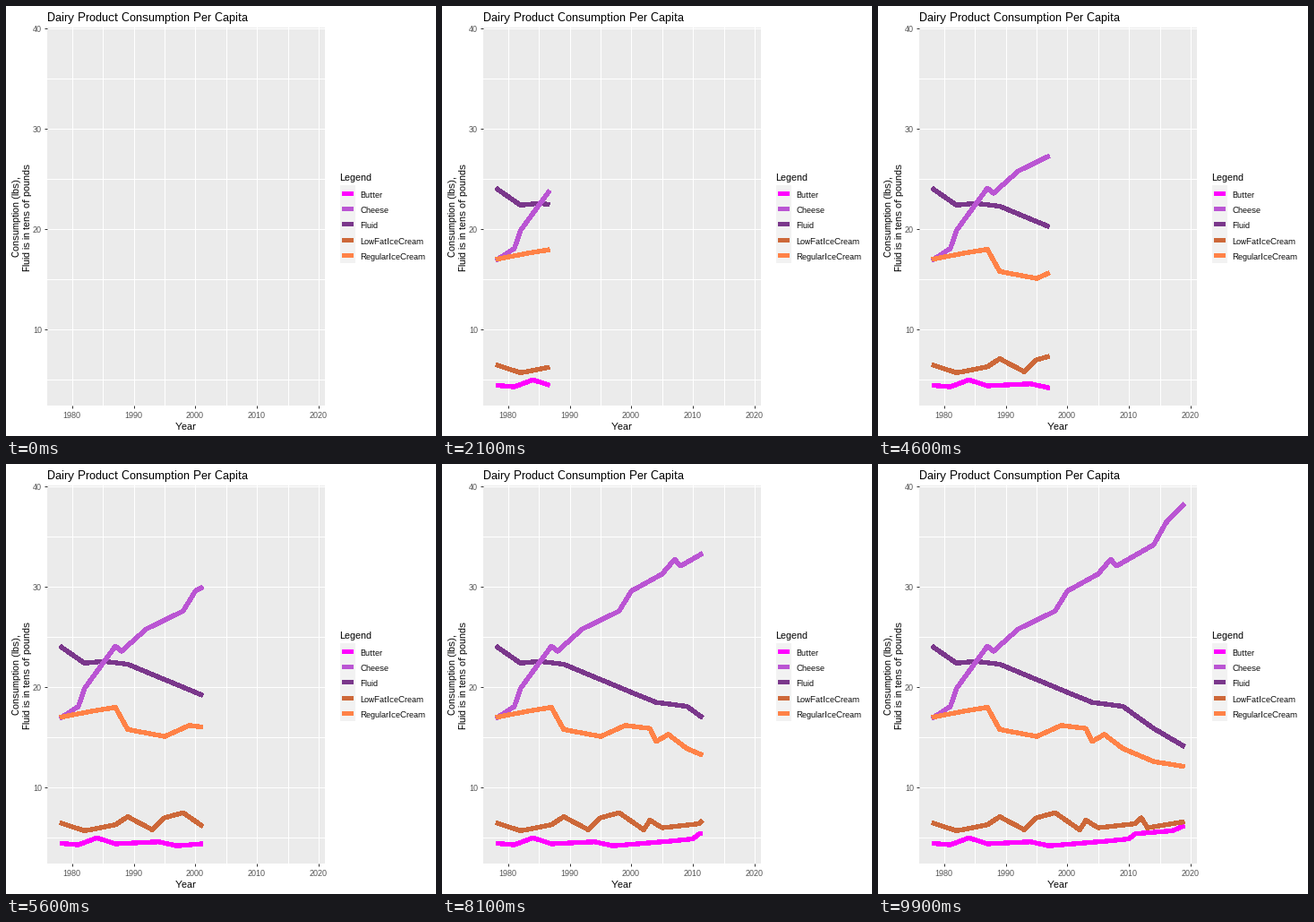
Recreate the animation shown at these times as a matplotlib script. Size 480 px wide and 480 px high, loop 10 s.

```python
import matplotlib.pyplot as plt
import numpy as np
from matplotlib.animation import FuncAnimation
from matplotlib.patches import Rectangle

SIZE, DPI = 480, 96
PX = 72 / DPI  # one pixel in points
FRAMES, INTERVAL = 100, 100
START, SPAN = 1978, 41
LEFT, TOP, RIGHT, BOTTOM = 46, 24, 356, 446
X_LIM, Y_LIM = (1975.93, 2021.03), (2.435, 40.114)
ROW = 17.28

plt.rcParams.update({
    "font.family": "Liberation Sans",
    "text.hinting": "native",
    "text.hinting_factor": 1,
})

# Name, colour, stacking order and turning points {years since START: value}
SERIES = [
    ("Butter", "#FF00FF", 2,
     {0: 4.45, 3: 4.3, 6: 5, 9: 4.4, 16: 4.6, 19: 4.2, 29: 4.7, 32: 4.9,
      33: 5.4, 39: 5.7, 41: 6.2}),
    ("Cheese", "#BA55D3", 3,
     {0: 16.9, 3: 18.1, 4: 19.9, 9: 24.1, 10: 23.6, 14: 25.8, 20: 27.6,
      22: 29.6, 27: 31.3, 29: 32.75, 30: 32.1, 36: 34.2, 38: 36.4, 41: 38.3}),
    ("Fluid", "#7A378B", 2,
     {0: 24.1, 4: 22.4, 7: 22.6, 11: 22.3, 22: 19.5, 26: 18.5, 31: 18.1,
      36: 15.9, 41: 14.1}),
    ("LowFatIceCream", "#CD6839", 2,
     {0: 6.5, 4: 5.7, 9: 6.3, 11: 7.1, 15: 5.8, 17: 7, 20: 7.5, 24: 5.8,
      25: 6.75, 27: 6, 33: 6.4, 34: 7, 35: 6, 41: 6.6}),
    ("RegularIceCream", "#FF8247", 4,
     {0: 17, 5: 17.6, 9: 18, 11: 15.8, 17: 15.1, 21: 16.2, 25: 15.9,
      26: 14.6, 28: 15.3, 31: 13.9, 36: 12.6, 41: 12.1}),
]

fig = plt.figure(figsize=(SIZE / DPI, SIZE / DPI), dpi=DPI, facecolor="white")


def text(x, y, s, size, color="black", **kw):
    """Write text with its baseline at pixel (x, y) from the top left."""
    return fig.text(x / SIZE, 1 - y / SIZE, s, fontsize=size * PX, color=color,
                    va="baseline", **kw)


def box(x, y, w, h, color):
    fig.add_artist(Rectangle((x / SIZE, 1 - (y + h) / SIZE), w / SIZE, h / SIZE,
                             facecolor=color, linewidth=0, antialiased=False))


# Panel with grid and ticks
ax = fig.add_axes([LEFT / SIZE, 1 - BOTTOM / SIZE,
                   (RIGHT - LEFT) / SIZE, (BOTTOM - TOP) / SIZE])
ax.set(xlim=X_LIM, ylim=Y_LIM, facecolor="#EBEBEB", axisbelow=True)
ax.spines[:].set_visible(False)
ax.set_xticks(range(1980, 2021, 10))
ax.set_xticks(range(1985, 2016, 10), minor=True)
ax.set_yticks(range(10, 41, 10))
ax.set_yticks(range(5, 36, 10), minor=True)
ax.tick_params(length=3 * PX, width=PX, color="#333333",
               labelbottom=False, labelleft=False)
ax.tick_params(which="minor", length=0)
ax.grid(which="both", color="white", linewidth=PX)

for year in range(1980, 2021, 10):
    x = np.interp(year, X_LIM, (LEFT, RIGHT))
    text(x - 0.5, 460, str(year), 9, "#4D4D4D", ha="center")
for value in range(10, 41, 10):
    y = np.interp(value, Y_LIM, (BOTTOM, TOP))
    text(40, y + 3.7, str(value), 9, "#4D4D4D", ha="right")

# Titles
text(46, 17, "Dairy Product Consumption Per Capita", 13)
text(201, 473, "Year", 11, ha="center")
for x, s in ((15, "Consumption (lbs),"), (27, "Fluid is in tens of pounds")):
    text(x, 235.5, s, 11, ha="center", rotation=90, rotation_mode="anchor")

# Legend
text(372, 195, "Legend", 11)
box(373, 200, 17, 87, "#F2F2F2")
for i, (name, color, *_) in enumerate(SERIES):
    box(375, round(206.9 + i * ROW), 13, 5, color)
    text(395, round(213.9 + i * ROW), name, 9)

lines = [
    ax.plot([], [], color=color, linewidth=4.3 * PX, zorder=z, antialiased=False,
            solid_capstyle="butt", solid_joinstyle="round")[0]
    for _, color, z, _ in SERIES
]


def update(frame):
    """Reveal every line up to the current moment."""
    now = SPAN * frame / (FRAMES - 1)
    for line, (*_, points) in zip(lines, SERIES):
        xs, ys = np.array(list(points)), list(points.values())
        seen = np.append(xs[xs < now], now)
        line.set_data(START + seen, np.interp(seen, xs, ys))
    return lines


anim = FuncAnimation(fig, update, frames=FRAMES, interval=INTERVAL,
                     repeat=True, repeat_delay=0)
plt.show()
```
